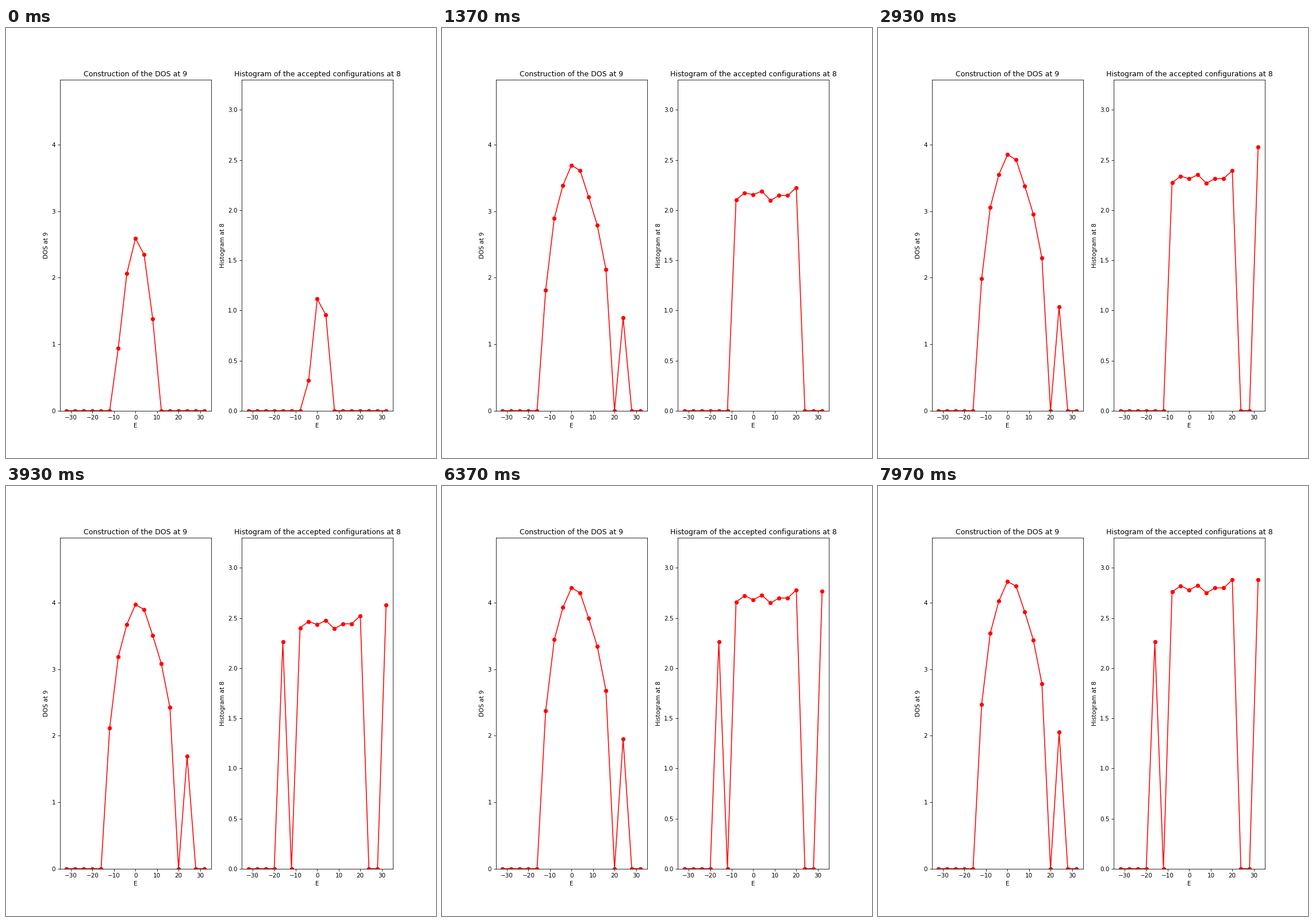
A matplotlib script that plays this animation: 748 px wide and 748 px high, repeating every 8 s.

```python
import numpy as np
import matplotlib.pyplot as plt
from matplotlib.animation import FuncAnimation

FRAMES, INTERVAL = 250, 32
FPS = 30
END = 7.97
RATE = 590  # counts per second while held in one bin

ENERGIES = np.arange(-32, 33, 4)
DOS_BINS = np.array([-12, -8, -4, 0, 4, 8, 12, 16, 24])
HIST_BINS = np.arange(-8, 21, 4)

# log10 profiles reached at the end of the walk
DOS_END = [2.47, 3.54, 4.02, 4.31, 4.24, 3.86, 3.44, 2.78, 2.05]
HIST_END = [2.76, 2.82, 2.77, 2.82, 2.75, 2.80, 2.80, 2.88]

# (bin, start, end) of the times the walker does not move
HOLDS = [(None, 1.69, 1.88), (32, 1.89, 2.61), (-16, 3.40, 3.71),
         (32, 5.93, 6.20), (32, 7.38, 7.68)]


def held(t, hold):
    _, start, end = hold
    return np.clip(t - start, 0, end - start)


def moving(t):
    return t - sum(held(t, h) for h in HOLDS)


def grow(t, bins, profile, peak, centre, spread):
    """Counts rise evenly; bins near the centre have a head start."""
    lead = peak * np.exp(-(bins - centre) ** 2 / spread)
    counts = np.zeros(len(ENERGIES))
    counts[(bins + 32) // 4] = (10 ** np.array(profile)
                                * (moving(t) + lead) / moving(END))
    return counts


def log_counts(counts):
    return np.log10(np.maximum(counts, 1))


def curves(t):
    dos = grow(t, DOS_BINS, DOS_END, .118, .3, 34)
    hist = grow(t, HIST_BINS, HIST_END, .155, 1.2, 13)
    for hold in HOLDS:
        hist[ENERGIES == hold[0]] += RATE * held(t, hold)
    return log_counts(dos), log_counts(np.round(hist))


def setup(ax, title, ylabel, top, ticks):
    ax.set_title(title)
    ax.set_xlabel("E")
    ax.set_ylabel(ylabel)
    ax.set_xlim(-35.2, 35.2)
    ax.set_xticks(range(-30, 31, 10))
    ax.set_yticks(ticks)
    ax.set_ylim(0, top)
    return ax.plot(ENERGIES, np.zeros(len(ENERGIES)), "ro-")[0]


fig, (left, right) = plt.subplots(1, 2, figsize=(10, 10), dpi=74.8)
fig.subplots_adjust(left=.125, right=.9, bottom=.11, top=.88, wspace=.2)
dos_line = setup(left, "Construction of the DOS at 9", "DOS at 9",
                 4.977, range(5))
hist_line = setup(right, "Histogram of the accepted configurations at 8",
                  "Histogram at 8", 3.302, np.arange(0, 3.1, .5))


def update(frame):
    step = np.ceil(frame * INTERVAL * FPS / 1000)
    dos, hist = curves(min(step / FPS, END))
    dos_line.set_ydata(dos)
    hist_line.set_ydata(hist)
    return dos_line, hist_line


anim = FuncAnimation(fig, update, frames=FRAMES, interval=INTERVAL,
                     repeat=True, repeat_delay=0)
plt.show()
```
